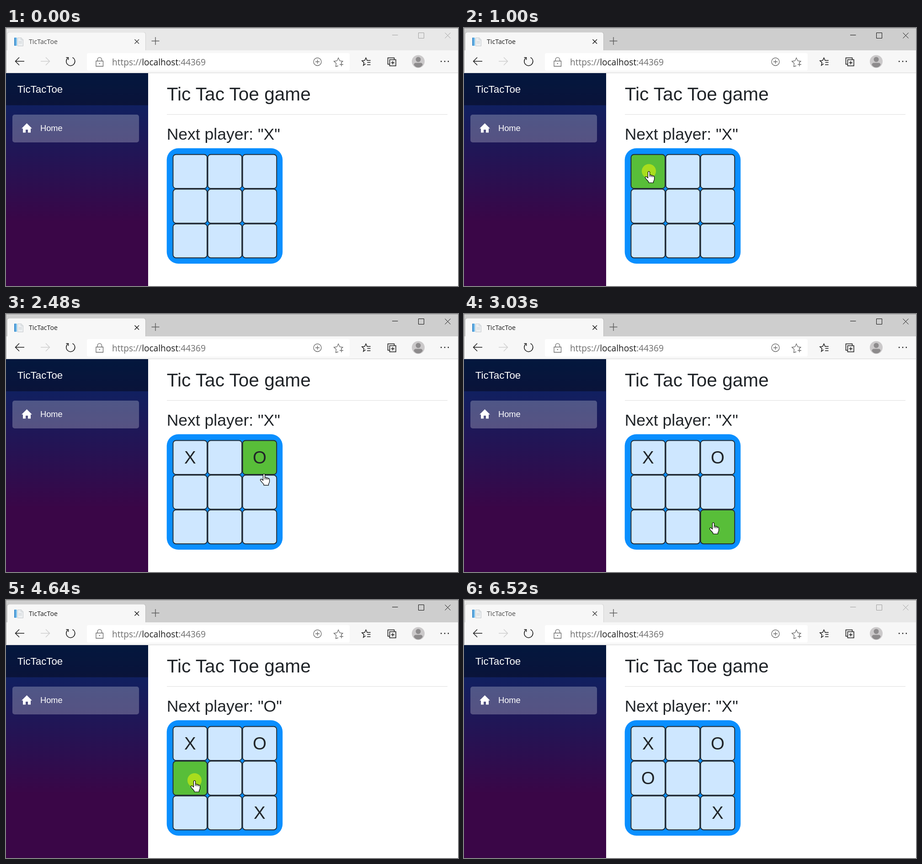
An HTML page for the animation above (6.6 s loop, 989 px wide and 566 px high).

```html
<!DOCTYPE html>
<html lang="en">
<head>
<meta charset="utf-8">
<title>TicTacToe</title>
<style>
  html, body { margin: 0; width: 100%; height: 100%; overflow: hidden; background: #fff; }
  svg { display: block; width: 100%; height: 100%; }
  .page { font-family: "Liberation Sans", Arial, sans-serif; fill: #212529; }
  .ui { font-family: "Open Sans", "Noto Sans", sans-serif; }
  .line { fill: none; stroke: #1c1c1c; stroke-width: 1.5; }
  .thin { fill: none; stroke: #6b6b6b; stroke-width: 1.3; }
  .light { fill: #fff; }
  .cell { stroke: #212a33; stroke-width: 1.9; }
</style>
</head>
<body>
<svg id="stage" viewBox="0 0 989 566">
  <defs>
    <linearGradient id="side" x1="0" y1="0" x2="0" y2="1">
      <stop offset="0" stop-color="#052767"/>
      <stop offset=".7" stop-color="#3a0647"/>
    </linearGradient>
    <linearGradient id="spine" x1="0" y1="0" x2="1" y2="0">
      <stop offset="0" stop-color="#2f83c8"/>
      <stop offset="1" stop-color="#8fd0f5"/>
    </linearGradient>
  </defs>

  <!-- title bar -->
  <rect id="bar" width="989" height="50"/>
  <path d="M2 50V14q0-5 5-5H301q5 0 5 5V50Z" fill="#000" opacity=".09"/>
  <path d="M3 50V14.500q0-5 5-5H300q5 0 5 5V50Z" fill="#f7f7f7"/>
  <path d="M0 .5H989M.5 0V98" stroke="#a3a3a3" fill="none"/>
  <rect x="18" y="21" width="6" height="18" rx="1" fill="url(#spine)"/>
  <path d="M25.500 21.500h8l4 4v14h-12z" fill="#eceff1" stroke="#c7cbce"/>
  <path d="M33 21.500v4.500h4.500M28 30h7M28 33h7" fill="none" stroke="#c7cbce"/>
  <text id="tab" class="ui" x="50" y="35" font-size="14.200">TicTacToe</text>
  <g id="tabTools" fill="none" stroke-width="1.400">
    <path d="M281.500 25l9.500 9.500M291 25l-9.500 9.500"/>
    <path d="M318.500 28.500h17M327 20v17" stroke="#5b5b5b"/>
  </g>
  <g id="winTools" fill="none">
    <path d="M845 15.500h12.500M902.500 10.500h12v12h-12zM960.500 10.500l12 12M972.500 10.500l-12 12"/>
  </g>

  <!-- address bar -->
  <rect x="1" y="49" width="988" height="49" fill="#f7f7f7"/>
  <path d="M0 98.500H989" stroke="#d5d5d5"/>
  <rect x="177" y="55" width="575" height="38.500" rx="4" fill="#fff"/>
  <path class="line" d="M40 73H21M29 64.500L20.500 73l8.500 8.500"/>
  <path class="line" d="M76 73h19M87 64.500l8.500 8.500-8.500 8.500" style="stroke:#cfcfcf"/>
  <path class="line" d="M145.500 64.600A9.500 9.500 0 1 1 135 66M131.500 64.800h5v5.200"/>
  <path class="thin" d="M197 72.500h15.500v11.500h-15.500zM200 72.500v-3a4.800 4.800 0 0 1 9.600 0v3"/>
  <circle cx="204.700" cy="78" r="1.200" fill="#6b6b6b"/>
  <text class="ui" x="232" y="82" font-size="19.100" fill="#6d6d6d">https://<tspan fill="#1b1b1b">localhost</tspan>:44369</text>
  <circle class="thin" cx="681.500" cy="74" r="8.500"/>
  <path class="thin" d="M677 74h9M681.500 69.500v9"/>
  <path class="thin" d="M727 83l-5.500 1.500 1-7-5-4.500 6.700-1 3-6.500 3 6.500 6.700 1-4 3.500M734 76v8M730 80h8"/>
  <path class="line" d="M787 78.500l-5 3.500 1.300-6-4.500-4.200 6-.6 2.700-5.700 2.700 5.700h7.500M790.500 75.500h7M790 80.500h7.500" stroke-width="1.300"/>
  <path class="line" d="M839.500 69.500h13.500v13.500h-13.500zM839 79.500h-3.500v-14h14v3.500M846.300 72.500v7.500M842.500 76.200h7.500"/>
  <circle cx="902" cy="73.500" r="14" fill="#cbc9ca"/>
  <circle cx="902" cy="69" r="5.500" fill="#8d8b8c"/>
  <path d="M892.500 81q0-4.500 4.500-4.500h10q4.500 0 4.500 4.500-3.800 5.500-9.500 5.500t-9.500-5.500z" fill="#8d8b8c"/>
  <path d="M951 72h2.400v2.400h-2.400zM958.800 72h2.400v2.400h-2.400zM966.600 72h2.400v2.400h-2.400z" fill="#222"/>

  <!-- page -->
  <rect y="99" width="311" height="467" fill="url(#side)"/>
  <rect y="99" width="311" height="70.500" opacity=".4"/>
  <rect x="14" y="190" width="277" height="61" rx="5" fill="#fff" opacity=".25"/>
  <path class="light" d="M45.500 209L34 220.500h3V229.500h6v-6.500h5v6.500h6v-9h3z"/>
  <g class="page">
    <text class="light" x="24.700" y="142" font-size="22.300">TicTacToe</text>
    <text class="light" x="75" y="226.300" font-size="18.300">Home</text>
    <text x="351.700" y="159" font-size="40.600">Tic Tac Toe game</text>
    <text id="next" x="351.700" y="244.500" font-size="35.500"></text>
  </g>
  <path d="M352 189.700H966" stroke="#e3e3e3" stroke-width="1.300"/>
  <rect x="351.700" y="263.700" width="253.500" height="253.300" rx="25.400" fill="#0a8fff"/>
  <g id="board" class="page" font-size="38.500" text-anchor="middle"></g>

  <g id="cursor">
    <circle id="press" r="15.500" fill="#ff0" opacity=".48"/>
    <g id="hand" stroke="#000" stroke-width="1.200" stroke-linejoin="round">
      <path class="light" d="M-2 2Q0-.8 2 2V8.500Q3.800 7.300 5.200 9.300Q7.300 8.300 8.500 10.300Q11.500 9.800 12 12.800V17.500Q12 20 10 22.500V25.500H-.5V23.500Q-2 21.500-5 18.500L-8 14.500Q-8.300 12-6 12Q-4 12.600-2 15Z"/>
      <path d="M2 8.500v4M5.200 9.300v3.700M8.500 10.300v3" fill="none"/>
    </g>
    <path id="arrow" class="light" d="M.5.500V20.500L5 16.300 8 23 11 21.700 8 15H14.800Z" stroke="#000"/>
  </g>
</svg>

<script>
const LOOP = 6600;
const ORIGIN = { x: 365.5, y: 277.5 }, PITCH = 76.1, SIZE = 74.5;
const $ = id => document.getElementById(id);

// Each leg moves the pointer in n held steps along a quadratic curve.
const legs = [
  { start: 130, end: 760, n: 9, from: [800, 556], via: [570, 449], to: [404.5, 314] },
  { start: 1380, end: 1850, n: 7, from: [404.5, 314], via: [553, 346], to: [564.5, 333.5] },
  { start: 2400, end: 3030, n: 9, from: [564.5, 333.5], via: [566, 400], to: [545.5, 457] },
  { start: 3500, end: 4100, n: 9, from: [545.5, 457], via: [482, 428], to: [417.5, 398.5] },
  { start: 4180, end: 4180, n: 1, to: [412.5, 395.5] },
  { start: 5260, end: 5900, n: 9, from: [412.5, 395.5], via: [544, 431], to: [801, 541] },
  { start: 5970, end: 5970, n: 1, to: [817, 553] }
];
const GONE = 6050;

const moves = [
  { down: 1000, up: 1080, mark: 1150, cell: 0 },
  { down: 2020, up: 2170, mark: 2170, cell: 2 },
  { down: 3090, up: 3170, mark: 3170, cell: 8 },
  { down: 4640, up: 4880, mark: 4880, cell: 3 }
];

function add(tag, attrs) {
  const node = document.createElementNS("http://www.w3.org/2000/svg", tag);
  for (const key in attrs) node.setAttribute(key, attrs[key]);
  return $("board").appendChild(node);
}

const cells = Array.from({ length: 9 }, (_, i) => {
  const x = ORIGIN.x + i % 3 * PITCH, y = ORIGIN.y + Math.floor(i / 3) * PITCH;
  return {
    box: add("rect", { class: "cell", x, y, width: SIZE, height: SIZE, rx: 6.5 }),
    text: add("text", { x: x + SIZE / 2, y: y + 50.5 })
  };
});

const smooth = u => u * u * (3 - 2 * u);
const show = (node, on) => node.setAttribute("visibility", on ? "visible" : "hidden");

function pointerAt(t) {
  const leg = legs.filter(l => t >= l.start).pop();
  if (!leg || t >= GONE) return null;
  if (leg.n === 1) return leg.to;
  const step = Math.floor((t - leg.start) / (leg.end - leg.start) * (leg.n - 1) + 1e-6);
  const s = smooth(Math.min(step + 1, leg.n) / leg.n), r = 1 - s;
  return [0, 1].map(k => r * r * leg.from[k] + 2 * r * s * leg.via[k] + s * s * leg.to[k]);
}

function cellAt(point) {
  if (!point) return -1;
  const col = Math.floor((point[0] - ORIGIN.x) / PITCH);
  const row = Math.floor((point[1] - ORIGIN.y) / PITCH);
  return col >= 0 && col < 3 && row >= 0 && row < 3 ? row * 3 + col : -1;
}

function draw(t) {
  const active = t >= 1000 && t < 6520;
  $("bar").setAttribute("fill", active ? "#cecece" : "#e8e8e8");
  $("tab").setAttribute("fill", active ? "#1a1a1a" : "#484848");
  $("tabTools").setAttribute("stroke", active ? "#111" : "#3c3c3c");
  $("winTools").setAttribute("stroke", active ? "#111" : "#a0a0a0");

  const point = pointerAt(t), hover = cellAt(point);
  const played = moves.filter(m => t >= m.mark).length;
  cells.forEach((cell, i) => {
    const turn = moves.findIndex(m => m.cell === i);
    cell.box.setAttribute("fill", i === hover ? "#58be39" : "#cee7ff");
    cell.text.textContent = turn >= 0 && turn < played ? "XO"[turn % 2] : "";
  });
  $("next").textContent = `Next player: "${"XO"[played % 2]}"`;

  if (point) $("cursor").setAttribute("transform", `translate(${point})`);
  show($("hand"), hover >= 0);
  show($("arrow"), point && hover < 0);
  show($("press"), moves.some(m => t >= m.down && t < m.up));
}

const born = performance.now();
function tick() {
  draw((performance.now() - born) % LOOP);
  requestAnimationFrame(tick);
}
tick();
</script>
</body>
</html>
```
